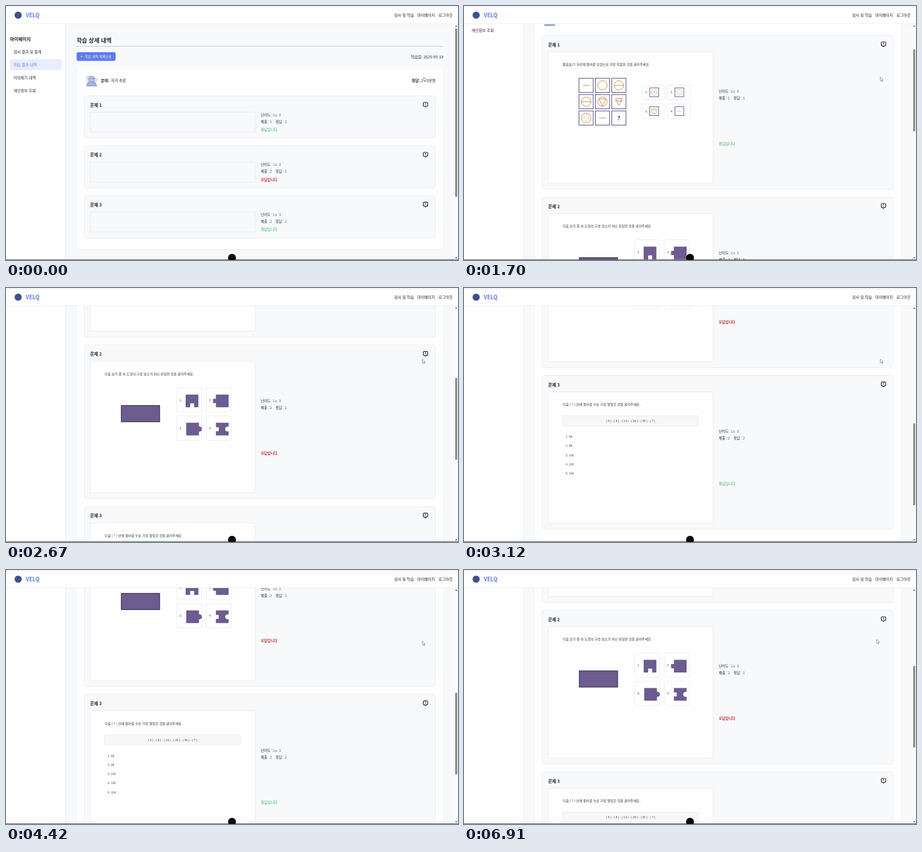
These frames come from a looping animation (800x451 px, 6.94 s). An HTML page:

```html
<!DOCTYPE html>
<html lang="ko">
<head>
<meta charset="utf-8">
<style>
html, body { margin: 0; width: 100%; height: 100%; overflow: hidden; background: #fff; }
svg { display: block; font-family: "Noto Sans CJK KR", "Noto Sans CJK", "Noto Sans KR", sans-serif; }
.latin { font-family: "Liberation Sans", Arial, sans-serif; }
text { white-space: pre; }
</style>
</head>
<body>
<svg id="stage" width="800" height="451" viewBox="0 0 800 451"></svg>
<script>
const LOOP = 6940, LOADED_AT = 240;
const INK = '#24262d', BLUE = '#5f7de8', LINE = '#ebecf0', CARD = '#f8f9fb';
const ORANGE = '#c58a4c', NAVY = '#43437f', PURPLE = '#6c5c8f';

// y is the vertical middle of the text
const text = (x, y, s, { size = 6.8, fill = INK, weight = 400, anchor = 'start', cls = '' } = {}) =>
  `<text x="${x}" y="${y + size * .37}" font-size="${size}" fill="${fill}" font-weight="${weight}" text-anchor="${anchor}" class="${cls}">${s}</text>`;
const rect = (x, y, w, h, fill, stroke = 'none', rx = 0, sw = 1) =>
  `<rect x="${x}" y="${y}" width="${w}" height="${h}" fill="${fill}" stroke="${stroke}" rx="${rx}" stroke-width="${sw}"/>`;
const circle = (x, y, r, fill, stroke = 'none', sw = 1) =>
  `<circle cx="${x}" cy="${y}" r="${r}" fill="${fill}" stroke="${stroke}" stroke-width="${sw}"/>`;
const path = (d, fill, stroke = 'none', sw = 1) =>
  `<path d="${d}" fill="${fill}" stroke="${stroke}" stroke-width="${sw}"/>`;
const group = (x, y, s) => `<g transform="translate(${x} ${y})">${s}</g>`;
const latin = (x, y, s, anchor = 'start') =>
  text(x, y, s, { size: 5.2, fill: '#444', anchor, cls: 'latin' });
const prompt = s => text(174.5, 52, s, { size: 5.85, weight: 500, fill: '#30323a' });

// Puzzle symbols: o circle, - line, v triangle, : dots, + plus, s struck triangle
function symbol(cx, cy, marks, k = 1) {
  const draw = {
    o: circle(0, 0, 8.3, 'none', ORANGE),
    '-': path('M-6 0H6', 'none', ORANGE),
    '=': path('M-8.3 0H8.3', 'none', ORANGE),
    v: path('M-6.5 -5H6.5L0 7.5Z', 'none', ORANGE),
    s: path('M-6 -5.5H6L0 6.5ZM-6.5 -1.5H6.5', 'none', ORANGE),
    ':': [[0, -4], [0, 4], [-4, 0], [4, 0]].map(([x, y]) => circle(x, y, .8, ORANGE)).join(''),
    '+': path('M-4 0H4M0 -4V4', 'none', ORANGE),
    '?': text(0, 0, '?', { size: 10, weight: 700, fill: '#30307a', anchor: 'middle' })
  };
  return `<g transform="translate(${cx} ${cy}) scale(${k})">${[...marks].map(m => draw[m]).join('')}</g>`;
}

function shapesQuestion() {
  const cells = ['-', 'o', 'o=', 'o=', 'ov', 's', 'o:', '-', '?'].map((m, i) => {
    const x = 203.5 + i % 3 * 29, y = 76.5 + (i / 3 | 0) * 29;
    return rect(x, y, 25.2, 25.2, '#fff', NAVY) + symbol(x + 12.6, y + 12.6, m);
  });
  const options = ['o+', 'o:', 'ov', '-'].map((m, i) => {
    const x = 316 + i % 2 * 44.5, y = 88.5 + (i >> 1) * 33.5;
    return rect(x, y, 40, 26, '#fff', LINE, 3) + latin(x + 5, y + 13, i + 1 + '.') +
      rect(x + 12.8, y + 5, 15.8, 15.8, '#fff', NAVY, 0, .9) + symbol(x + 20.7, y + 12.9, m, .6);
  });
  return prompt('물음표(?) 자리에 들어갈 모양으로 가장 적합한 것을 골라주세요.') + cells.join('') + options.join('');
}

function piecesQuestion() {
  const pieces = [
    'M16 12h22.5v22.5h-7.5v-7h-7v7h-8z',
    'M17 12h22.5v22.5h-22.5v-7.5h-5v-7.5h5z',
    'M17 12h22.5v6.7a4.6 4.6 0 1 1 0 9.1v6.7h-22.5z',
    'M17 12h22.5v7.2a4.4 4.4 0 1 0 0 8.1v7.2h-22.5v-7.5h5v-7h-5z'
  ].map((d, i) => group(302 + i % 2 * 52.5, 76.5 + (i >> 1) * 50,
    rect(0, 0, 44.5, 43, '#fff', LINE, 4) + latin(5, 21.5, i + 1 + '.') + path(d, PURPLE)));
  return prompt('다음 보기 중 이 도형의 구성 요소가 아닌 유일한 것을 골라주세요.') +
    rect(204, 108, 68, 29, PURPLE, '#25222e') + pieces.join('');
}

function numbersQuestion() {
  return prompt('다음 ( ? ) 안에 들어갈 수로 가장 알맞은 것을 골라주세요.') +
    rect(174.5, 72, 240.5, 18.5, '#f7f7f9', LINE, 3) +
    latin(295, 81.5, '( 5 ) - ( 8 ) - ( 14 ) - ( 26 ) - ( 50 ) - ( ? )', 'middle') +
    [96, 98, 100, 102, 104].map((n, i) => latin(180, 109.3 + i * 16.3, `${i + 1}. ${n}`)).join('');
}

const questions = [
  { picked: 1, answer: 1, body: shapesQuestion },
  { picked: 2, answer: 1, body: piecesQuestion },
  { picked: 2, answer: 2, body: numbersQuestion }
];

function card(q, i, loaded) {
  const info = loaded ? [100, 112, 192.7] : [34.2, 46.2, 60.5];
  const bold = { size: 6.25, weight: 500 }, thin = { size: 6.25, fill: '#555862' };
  const right = q.picked === q.answer;
  return rect(138.5, .5, 621.5, loaded ? 273 : 75, CARD, LINE, 5) +
    text(149, 17, `문제 ${i + 1}`, { size: 7.6, weight: 700 }) +
    path('M740.5 12h4a2 2 0 0 1 2 2v3a2 2 0 0 1 -2 2h-.7l-1.3 1.5l-1.3 -1.5h-.7a2 2 0 0 1 -2 -2v-3a2 2 0 0 1 2 -2zM742.5 13.3v2.2M742.5 16.6v1', 'none', '#15161a', 1.1) +
    rect(149, 29.5, 292, loaded ? 233.5 : 35.5, loaded ? '#fefefe' : CARD, LINE, 2) +
    text(451, info[0], '난이도 :', bold) + text(473, info[0], 'Lv. 3', thin) +
    text(451, info[1], '제출 :', bold) + text(467, info[1], q.picked, thin) +
    text(477, info[1], '정답 :', bold) + text(493.5, info[1], q.answer, thin) +
    text(451, info[2], right ? '정답입니다' : '오답입니다',
      { size: 6.3, weight: right ? 400 : 700, fill: right ? '#35ac5c' : '#b5302d' }) +
    (loaded ? q.body() : '');
}

function page(loaded) {
  const menu = ['검사 결과 및 통계', '학습 결과 내역', '이의제기 내역', '개인정보 조회'];
  const bottom = loaded ? 1026.5 : 432;
  return text(7, 59, '마이페이지', { size: 8, weight: 700 }) +
    rect(7, 94.5, 91.5, 19.5, '#eaedfd', 'none', 3) +
    menu.map((s, i) => text(13.3, 81.3 + i * 23, s, { fill: i === 1 ? BLUE : INK })).join('') +
    text(125, 61, '학습 상세 내역', { size: 10.2, weight: 700 }) +
    rect(125, 71, 649, 1, '#c3c5cb') +
    rect(125, 82, 69, 15.5, BLUE, 'none', 3) +
    text(159.5, 90, '← 학습 내역 목록으로', { size: 6, fill: '#fff', weight: 500, anchor: 'middle' }) +
    text(774, 90, '학습일: 2025-05-19', { anchor: 'end' }) +
    rect(124, 107.5, 651, bottom - 106, '#f0f1f5', 'none', 7) +
    rect(125, 107, 649, bottom - 107, '#fefefe', 'none', 6) +
    group(151, 133,
      circle(0, 1, 9.5, '#e3e8f8') + circle(-6, -6, 2.6, '#fff', '#8795c5', .8) +
      rect(-4.5, -8, 10, 9, '#b9c5ea', '#7383b8', 3, .8) + circle(-1.5, -4, 1, '#566aa9') + circle(3, -4, 1, '#566aa9') +
      path('M-9 9L-5 2H6L10 9Z', '#a3b2df', '#7383b8', .8) + circle(8, -2, 2.2, '#fff', '#8795c5', .8)) +
    text(168, 133, '분야:', { size: 6.7, weight: 700 }) + text(186, 133, '지각 추론', { size: 6.7, weight: 500 }) +
    text(760.5, 133, '<tspan font-weight="700">정답:</tspan> 2 / 3문항', { size: 6.7, weight: 500, anchor: 'end' }) +
    questions.map((q, i) => group(0, 159 + i * (loaded ? 287 : 88.7), card(q, i, loaded))).join('');
}

document.getElementById('stage').innerHTML =
  rect(0, 0, 800, 451, '#f8f9fb') + rect(0, 0, 105, 451, '#fefefe') + rect(105, 0, 1, 451, '#eceef1') +
  `<g id="loading">${page(false)}</g><g id="loaded">${page(true)}</g>` +
  rect(794, 31, 6, 420, '#fbfbfb') +
  path('M794.8 37L796.8 34L798.8 37ZM794.8 446L796.8 449L798.8 446Z', '#777') +
  '<rect id="thumb" x="795" width="3.6" rx="1.8" fill="#8b8b8b"/>' +
  rect(0, 0, 800, 31, '#fefefe') + rect(0, 1, 800, 1, '#e9e9eb') + rect(0, 31, 800, 1, '#eceef1') +
  circle(21.5, 16.3, 6.3, '#3d5288') +
  text(35, 16.5, 'VELQ', { size: 9.6, weight: 700, fill: BLUE }) +
  text(687, 16.5, '검사 및 학습') + text(728, 16.5, '마이페이지') + text(765.5, 16.5, '로그아웃') +
  rect(0, 450, 800, 1, '#55565a') + circle(400, 447, 7, '#0b0b0d') +
  `<g id="cursor">${path('M0 0V7L1.7 5.6L2.9 8L4 7.5L2.9 5.2H5Z', '#fff', '#666a72', .7)}</g>`;

const [loading, loaded, thumb, cursor] = ['loading', 'loaded', 'thumb', 'cursor'].map(id => document.getElementById(id));

// Eased moves: start, end, from, to
const scrolls = [[480, 760, 0, 42], [1400, 2300, 42, 292], [2480, 3180, 292, 584], [3982, 5100, 584, 375]];
const cursorX = [[300, 800, 739.5, 737], [4950, 5320, 737, 730.3]];
const cursorY = [[4950, 5320, 126.3, 123.3]];

function at(moves, t) {
  let v = moves[0][2];
  for (const [start, end, from, to] of moves) {
    if (t < start) break;
    const p = Math.min(1, (t - start) / (end - start));
    v = from + (to - from) * p * p * (3 - 2 * p);
  }
  return v;
}

function frame(now) {
  const t = now % LOOP, y = at(scrolls, t), ready = t >= LOADED_AT;
  loading.style.display = ready ? 'none' : '';
  loaded.style.display = ready ? '' : 'none';
  loading.setAttribute('transform', `translate(0 ${-y})`);
  loaded.setAttribute('transform', `translate(0 ${-y})`);
  thumb.setAttribute('y', 39.5 + y * .347);
  thumb.setAttribute('height', ready ? 146 : 299.5);
  cursor.setAttribute('transform', `translate(${at(cursorX, t)} ${at(cursorY, t)})`);
  requestAnimationFrame(frame);
}
frame(0);
</script>
</body>
</html>
```
